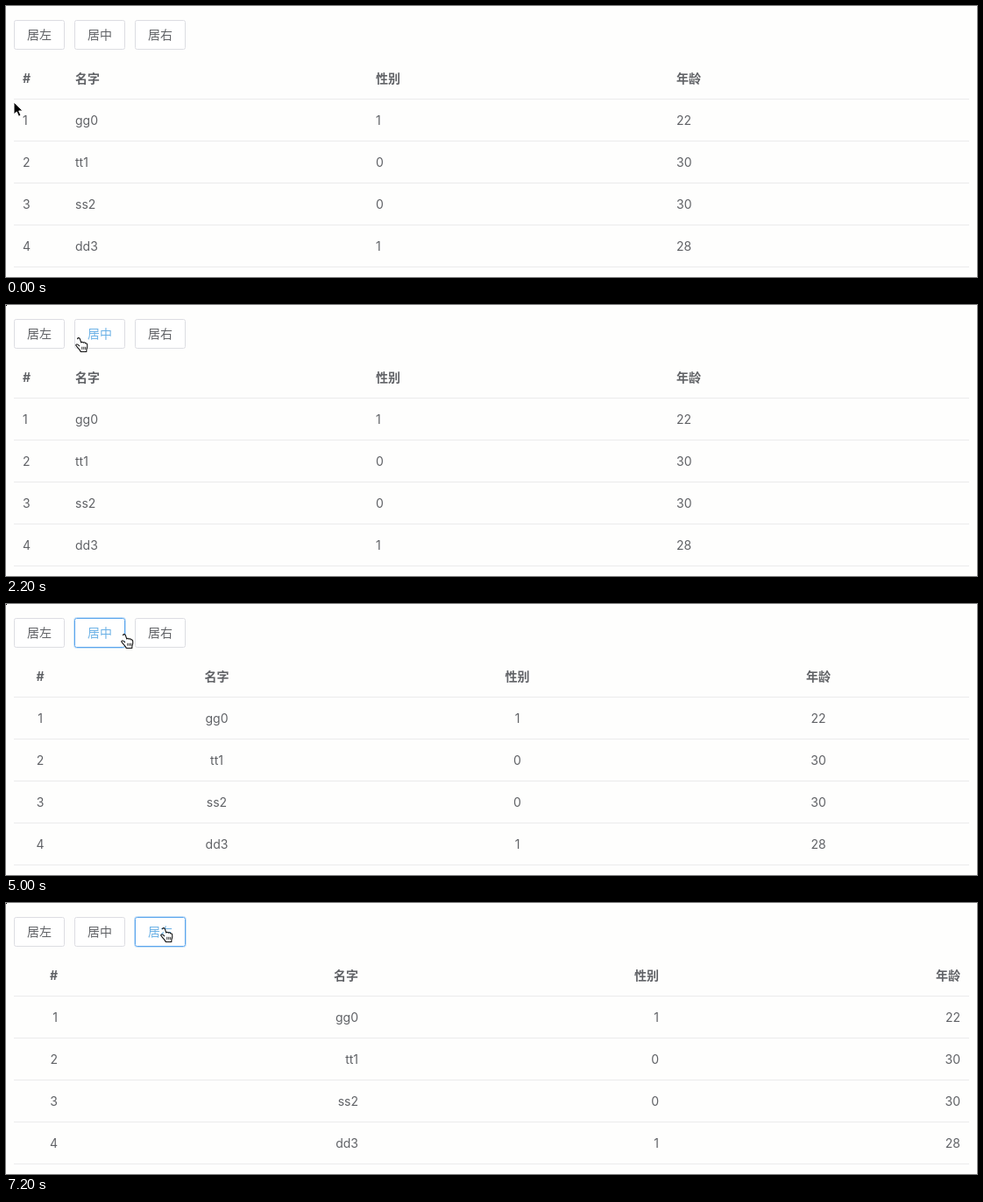
An HTML page that plays this animation: 1108x310 px, repeating every 8000 ms.

```html
<!DOCTYPE html>
<html lang="zh">
<head>
<meta charset="utf-8">
<style>
  html, body { margin: 0; width: 100%; height: 100%; overflow: hidden; background: #fefefd; }
  svg { display: block; }
  text { font: 14px Inter, "Noto Sans CJK SC", "Noto Sans CJK", sans-serif; fill: #606266; }
  .head { font-weight: 700; }
  .line { fill: #ebebec; }
  .btn rect { fill: #fff; stroke: #dcdde2; }
  .btn text { text-anchor: middle; }
  .btn .glow { fill: none; stroke: none; }
  .hover text { fill: #6bb1e6; }
  .focus rect { stroke: #5ba5ec; }
  .focus .glow { stroke: #c3dff8; }
</style>
</head>
<body>
<svg id="stage" width="1108" height="310">
  <rect id="dot" width="1" height="1"/>
  <g id="table"></g>
  <g id="buttons"></g>
  <g id="cursor">
    <path id="arrow" d="M0 0V14L3.2 11 5.5 16.3 8 15.2 5.7 10H10.2Z" stroke="#fff"/>
    <g id="hand" transform="translate(-4 -1)" fill="#fff" stroke="#111" stroke-width="1.1" stroke-linejoin="round">
      <path d="M2.6 2.2C2.2.4 4.8 0 5.4 1.8L6.8 6C7.4 4.9 9 5 9.3 6.3 9.9 5.4 11.4 5.7 11.6 6.9 12.4 6.4 13.6 7 13.7 8.3 14.2 11 13.4 12.5 12.9 14L12.8 16.5H6.3C5.5 14.4 4 13.2 2.6 11.4 1.6 10.2.4 9.2.8 8.5 1.3 7.6 2.9 8 4.2 9.3L5 10.2"/>
      <path d="M7.8 10.8v3M9.8 10.8v3M11.7 10.8v3" stroke-width=".9"/>
    </g>
  </g>
</svg>
<script>
const LOOP = 8000, TICK = 200;
const $ = id => document.getElementById(id);

function add(parent, tag, attrs, text = "") {
  const el = document.createElementNS("http://www.w3.org/2000/svg", tag);
  for (const key in attrs) el.setAttribute(key, attrs[key]);
  el.textContent = text;
  return parent.appendChild(el);
}

// Table: cells keep their column so they can be realigned
const columns = [[9, 69], [69, 412], [412, 755], [755, 1099]];
const rows = [
  ["#", "名字", "性别", "年龄"],
  ["1", "gg0", "1", "22"],
  ["2", "tt1", "0", "30"],
  ["3", "ss2", "0", "30"],
  ["4", "dd3", "1", "28"]
];
const cells = [];
rows.forEach((row, r) => {
  row.forEach((label, c) => {
    const el = add($("table"), "text", { y: 88 + 48 * r, class: r ? "" : "head" }, label);
    cells.push({ el, col: columns[c] });
  });
  add($("table"), "rect", { x: 9, y: 106 + 48 * r, width: 1090, height: 1, class: "line" });
});

const buttons = ["居左", "居中", "居右"].map((label, i) => {
  const x = 9 + 69 * i, g = add($("buttons"), "g", {});
  add(g, "rect", { x: x - .5, y: 15.5, width: 59, height: 35, rx: 3, class: "glow" });
  add(g, "rect", { x: x + .5, y: 16.5, width: 57, height: 33, rx: 2 });
  add(g, "text", { x: x + 29, y: 38 }, label);
  return { g, x };
});

// Pointer tip: time, x, y
const path = [
  [0, 9, 110], [600, 9, 110], [1400, 54, 48], [1600, 56, 44], [1800, 57, 43],
  [2600, 109, 33], [2800, 109, 33], [3200, 110, 31], [4400, 110, 31],
  [5000, 135, 35], [5600, 177, 38], [5800, 178, 37], [6600, 180, 29], [LOOP, 180, 29]
];

function pointer(t) {
  const i = path.findIndex(p => p[0] > t);
  const [t0, x0, y0] = path[i - 1], [t1, x1, y1] = path[i];
  const k = (t - t0) / (t1 - t0);
  return [Math.round(x0 + (x1 - x0) * k), Math.round(y0 + (y1 - y0) * k)];
}

function align(mode) {
  for (const { el, col: [left, right] } of cells) {
    el.setAttribute("x", [left + 10, (left + right) / 2, right - 10][mode]);
    el.setAttribute("text-anchor", ["start", "middle", "end"][mode]);
  }
}

function draw(now) {
  const t = Math.floor(now % LOOP / TICK) * TICK;
  const [x, y] = pointer(t);
  const over = buttons.findIndex(b => x >= b.x && x < b.x + 58 && y >= 16 && y < 50);
  const focus = t >= 7000 ? 2 : t >= 3600 ? 1 : -1;

  buttons.forEach(({ g }, i) => g.setAttribute("class",
    "btn" + (i === over ? " hover" : "") + (i === focus ? " focus" : "")));
  align(t >= 7200 ? 2 : t >= 3800 ? 1 : 0);

  $("dot").style.display = t >= 200 ? "" : "none";
  $("cursor").setAttribute("transform", `translate(${x} ${y})`);
  $("hand").style.display = over < 0 ? "none" : "";
  $("arrow").style.display = over < 0 ? "" : "none";
  requestAnimationFrame(draw);
}

const start = performance.now();
const frame = draw;
draw = now => frame(Math.max(0, now - start));
draw(start);
</script>
</body>
</html>
```
